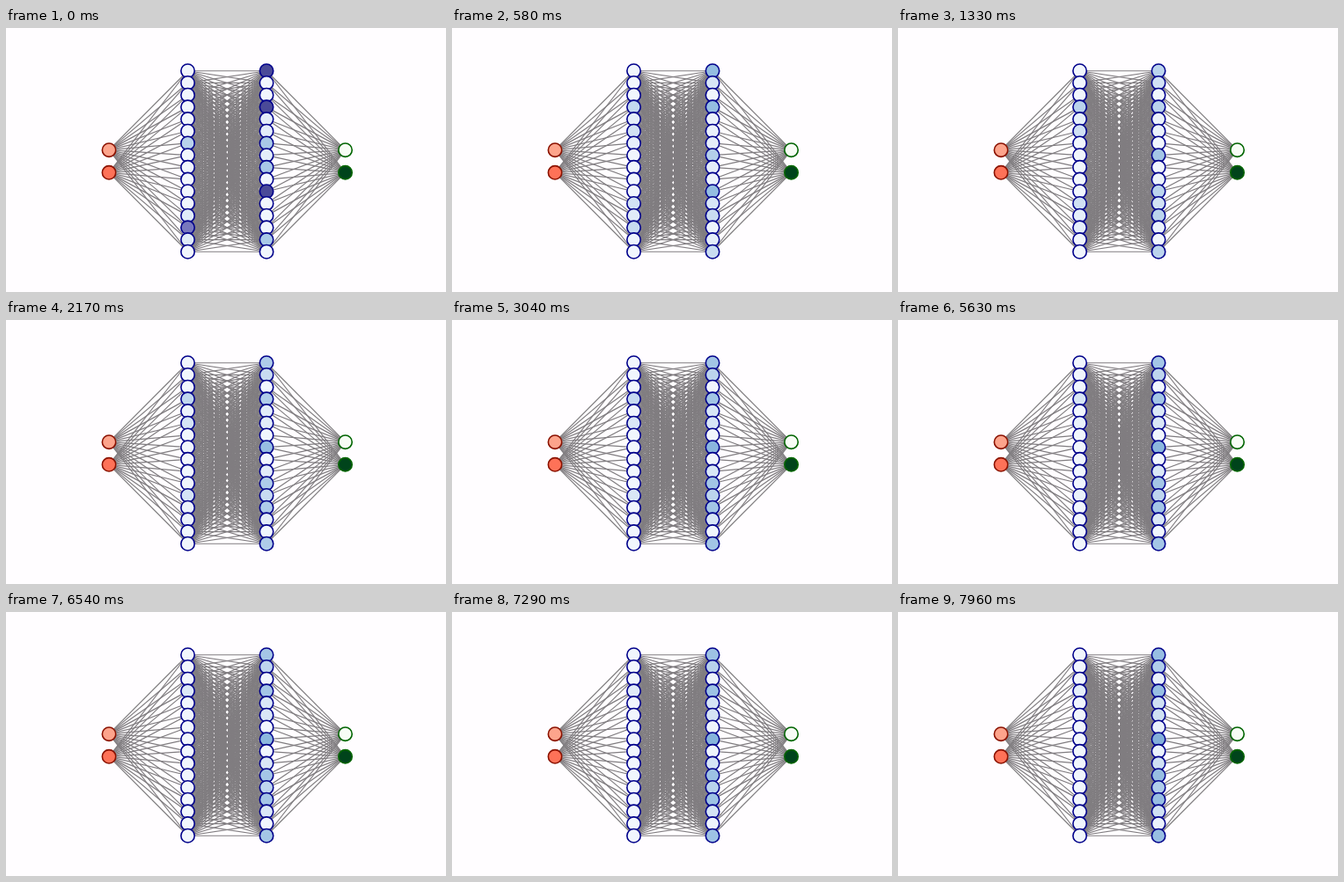
These frames come from a looping animation (500 px wide and 300 px high, 8 s). An HTML page:

```html
<!DOCTYPE html>
<html lang="en">
<head>
<meta charset="utf-8">
<title>Neural network activations</title>
<style>
  html, body { margin: 0; width: 100%; height: 100%; overflow: hidden; background: #fffdff; }
  svg { display: block; width: 500px; height: 300px; }
</style>
</head>
<body>
<svg id="stage" viewBox="0 0 500 300"></svg>
<script>
const LOOP = 8000, FPS = 24, SETTLING = 1330, REST = 3;
const CENTER_X = 251.3, CENTER_Y = 151.5, LAYER_GAP = 89.5;
const stage = document.getElementById('stage');

function add(tag, attributes) {
  const node = document.createElementNS('http://www.w3.org/2000/svg', tag);
  for (const name in attributes) node.setAttribute(name, attributes[name]);
  return stage.appendChild(node);
}

const mix = (a, b, k) => a + (b - a) * k;

// Activations map a level in percent to the nodes that have it, counted from
// the top; the rest stay at REST. Drift shifts the levels over time.
const layers = [
  { count: 2, gap: 25.7, stroke: '#8b1200', fills: ['#fda48c', '#fe7258'] },
  {
    count: 16, gap: 13.7, stroke: '#00008b',
    initial: { 75: [13], 30: [6], 12: [12, 14] },
    trained: { 34: [3], 24: [5, 11], 13: [4, 12, 13] },
    drift: [[0, 0], [LOOP, -25]]
  },
  {
    count: 16, gap: 13.7, stroke: '#00008b',
    initial: { 100: [0, 3, 10], 36: [6, 8, 14], 10: [4, 5, 7] },
    trained: { 48: [7], 39: [0, 3, 10, 12, 15], 29: [1, 11], 16: [4, 5, 9, 13] },
    drift: [[0, -10], [SETTLING, -10], [3040, 0], [4290, -10], [5630, -1], [6540, -1], [LOOP, 4]]
  },
  { count: 2, gap: 25.7, stroke: '#006400', fills: ['#f7fcf5', '#00441b'] }
];

layers.forEach((layer, i) => {
  const x = CENTER_X + (i - 1.5) * LAYER_GAP;
  layer.points = Array.from({ length: layer.count }, (_, j) =>
    ({ x, y: CENTER_Y + (j - (layer.count - 1) / 2) * layer.gap }));
});

layers.slice(1).forEach((layer, i) => {
  for (const a of layers[i].points)
    for (const b of layer.points)
      add('line', { x1: a.x, y1: a.y, x2: b.x, y2: b.y, stroke: '#807d80', 'stroke-width': 1.2 });
});

for (const layer of layers)
  layer.circles = layer.points.map((p, i) => add('circle', {
    cx: p.x, cy: p.y, r: 7.7, stroke: layer.stroke, 'stroke-width': 1.6,
    fill: layer.fills ? layer.fills[i] : 'none'
  }));

const ramp = ['#f7faff', '#c6daf0', '#84b3dc', '#7878be', '#4a4a98']
  .map(hex => [1, 3, 5].map(i => parseInt(hex.slice(i, i + 2), 16)));

function shade(percent) {
  const position = Math.min(percent / 25, 4);
  const i = Math.min(Math.floor(position), 3);
  return `rgb(${ramp[i].map((c, j) => Math.round(mix(c, ramp[i + 1][j], position - i)))})`;
}

function interpolate(keys, t) {
  const i = Math.max(1, keys.findIndex(key => key[0] >= t));
  const [start, a] = keys[i - 1], [end, b] = keys[i];
  return mix(a, b, (t - start) / (end - start));
}

function level(groups, node) {
  const match = Object.keys(groups).find(key => groups[key].includes(node));
  return match ? Number(match) : REST;
}

function activation(layer, node, t) {
  const trained = Math.max(REST, level(layer.trained, node) + interpolate(layer.drift, t));
  const remaining = Math.max(0, 1 - t / SETTLING) ** 3;
  return mix(trained, level(layer.initial, node), remaining);
}

function draw(now) {
  const t = Math.floor((now % LOOP) * FPS / 1000) * 1000 / FPS;
  for (const layer of layers.filter(layer => layer.trained))
    layer.circles.forEach((circle, i) => circle.setAttribute('fill', shade(activation(layer, i, t))));
  requestAnimationFrame(draw);
}
draw(0);
</script>
</body>
</html>
```
